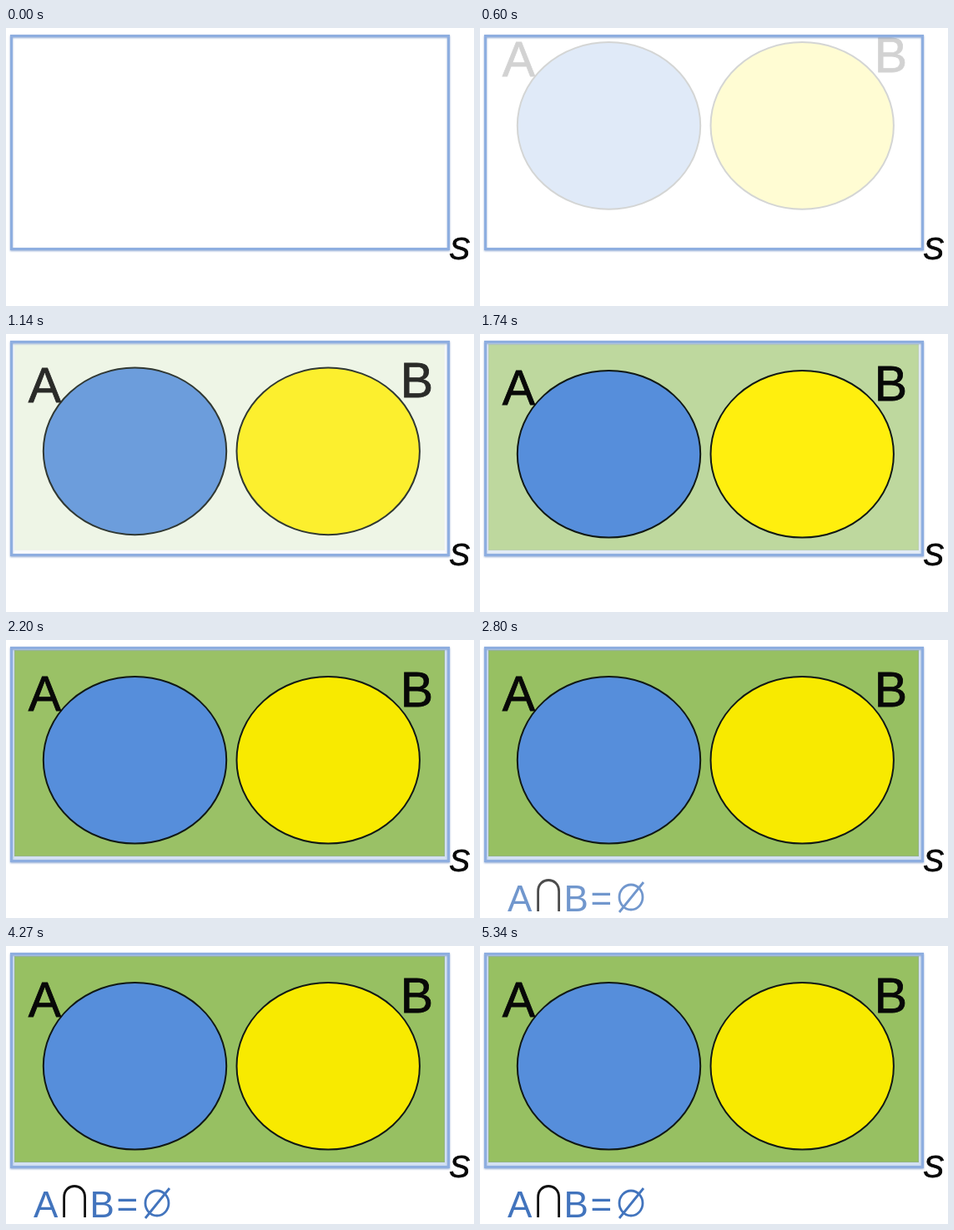
Animation, 561 px wide and 334 px high, one loop 5400 ms. Source, as an HTML page:

```html
<!DOCTYPE html>
<html lang="en">
<head>
<meta charset="utf-8">
<title>Disjoint sets</title>
<style>
  html, body { margin: 0; width: 100%; height: 100%; overflow: hidden; background: #fff; }
  svg { display: block; width: 561px; height: 334px; font-family: "Liberation Sans", Arial, sans-serif; }
  .frame { fill: none; stroke: #8eaee0; stroke-width: 3; filter: drop-shadow(0.8px 1px 1.3px #93acd4); }
  ellipse { stroke: #101814; stroke-width: 2; }
  .label { font-size: 59px; }
  .label, .corner { fill: #080808; stroke: #080808; stroke-width: 0.8; }
  .formula { font-size: 44px; fill: #4274bd; }
  .symbol { fill: none; stroke-width: 2.8; }
</style>
</head>
<body>
<svg viewBox="0 0 561 334">
  <g id="universe">
    <rect x="7" y="10" width="523" height="255" fill="#d3e1f3"/>
    <rect x="10.5" y="12.5" width="515" height="247" fill="#97c062" stroke="#94b482"/>
  </g>
  <rect class="frame" x="6.5" y="9.5" width="524" height="256"/>
  <text class="corner" x="531.3" y="278" font-size="37" font-style="italic">S</text>
  <g id="sets">
    <ellipse cx="154.5" cy="144.3" rx="109.7" ry="100.3" fill="#568edb"/>
    <ellipse id="setB" cx="386.2" cy="144.3" rx="109.7" ry="100.3"/>
    <text class="label" x="26.8" y="85.3">A</text>
    <text class="label" x="472.8" y="79.8">B</text>
  </g>
  <g id="formula" class="formula">
    <text x="33" y="325.5">A</text>
    <path class="symbol" d="M69.6 326V302C69.6 284 94.6 284 94.6 302V326" stroke="#111"/>
    <text x="100.5" y="325.5">B</text>
    <text x="132.5" y="325.5">=</text>
    <path class="symbol" d="M167 309a14 15 0 1 0 28 0a14 15 0 1 0 -28 0M167 327L196 291" stroke="#4274bd"/>
  </g>
</svg>
<script>
const LOOP = 5400;
const [universe, sets, setB, formula] =
  ["universe", "sets", "setB", "formula"].map(id => document.getElementById(id));
const progress = (t, start, end) => Math.min(1, Math.max(0, (t - start) / (end - start)));

function draw(now) {
  const t = now % LOOP;

  // The sets drop into place while fading in.
  const entry = progress(t, 460, 1260);
  sets.setAttribute("opacity", entry);
  sets.setAttribute("transform", `translate(0 ${-34 * (1 - entry) ** 1.2})`);

  const settle = progress(t, 1740, 2200);
  setB.setAttribute("fill", `rgb(${255 - 7 * settle}, ${239 - 5 * settle}, ${14 * (1 - settle)})`);

  universe.setAttribute("opacity", progress(t, 940, 2240));
  formula.setAttribute("opacity", progress(t, 2280, 2980));
  requestAnimationFrame(draw);
}
requestAnimationFrame(draw);
</script>
</body>
</html>
```
